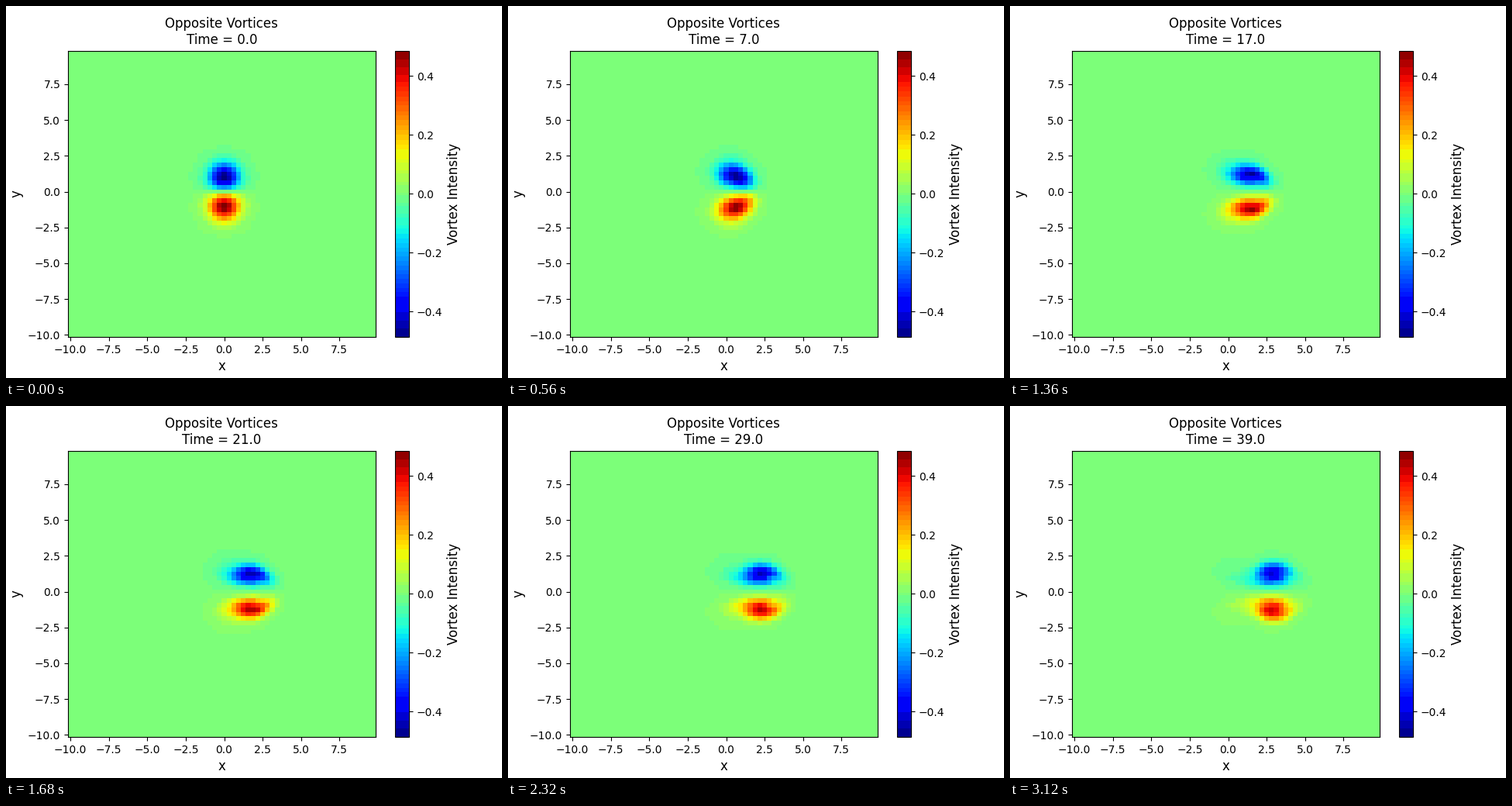
These frames come from a looping animation (640 by 480 pixels, 3.2 s). A matplotlib script:

```python
import numpy as np
import matplotlib as mpl
import matplotlib.pyplot as plt
from matplotlib.animation import FuncAnimation
from matplotlib.colors import ListedColormap

N, L = 64, 20.0
H = L / N
NU = 0.001
FRAMES, INTERVAL = 40, 80
SUBSTEPS = 10

grid = np.arange(N) * H - L / 2
X, Y = np.meshgrid(grid, grid)
k = 2 * np.pi * np.fft.fftfreq(N, H)
KX, KY = np.meshgrid(k, k)
K2 = KX**2 + KY**2
K2[0, 0] = 1.0


def diff(f, axis):
    """Periodic central difference."""
    return (np.roll(f, -1, axis) - np.roll(f, 1, axis)) / (2 * H)


def laplacian(f):
    near = sum(np.roll(f, s, a) for s in (-1, 1) for a in (0, 1))
    return (near - 4 * f) / H**2


def rhs(w):
    spec = -np.fft.fft2(w) / K2
    spec[0, 0] = 0
    psi = np.fft.ifft2(spec).real
    advection = diff(psi, 0) * diff(w, 1) - diff(psi, 1) * diff(w, 0)
    return NU * laplacian(w) - advection


def rk4(w, dt):
    a = rhs(w)
    b = rhs(w + dt / 2 * a)
    c = rhs(w + dt / 2 * b)
    d = rhs(w + dt * c)
    return w + dt / 6 * (a + 2 * b + 2 * c + d)


def vortex(y0):
    return 0.5 * np.exp(-X**2 - (Y - y0) ** 2)


def solve():
    w = vortex(-1) - vortex(1)
    fields = [w]
    for _ in range(FRAMES - 1):
        for _ in range(SUBSTEPS):
            w = rk4(w, 1 / SUBSTEPS)
        fields.append(w)
    return fields


def banded_jet():
    """Jet reduced to 3-4-3 bits per channel, each band in its mean colour."""
    rgb = mpl.colormaps["jet"](np.arange(256), bytes=True)[:, :3].astype(int)
    key = (rgb[:, 0] >> 5) * 256 + (rgb[:, 1] >> 4) * 8 + (rgb[:, 2] >> 5)
    weight = np.ones(256)
    weight[128] = 1e4  # the still background dominates its band
    out = np.empty((256, 3))
    for band in np.unique(key):
        m = key == band
        out[m] = np.average(rgb[m], axis=0, weights=weight[m])
    return ListedColormap(out / 255)


fields = solve()
peak = np.abs(fields[0]).max()

fig, ax = plt.subplots(figsize=(6.4, 4.8), dpi=100)
mesh = ax.pcolormesh(grid, grid, fields[0], cmap=banded_jet(),
                     vmin=-peak, vmax=peak, shading="nearest")
bar = fig.colorbar(mesh, ax=ax)
bar.set_label("Vortex Intensity", fontsize=12)
ax.set_xlabel("x", fontsize=12)
ax.set_ylabel("y", fontsize=12)
title = ax.set_title("", fontsize=12)


def update(i):
    mesh.set_array(fields[i])
    title.set_text(f"Opposite Vortices\nTime = {i:.1f}")
    return mesh, title


update(0)
anim = FuncAnimation(fig, update, frames=FRAMES, interval=INTERVAL,
                     repeat=True, repeat_delay=0, blit=False)
plt.show()
```
